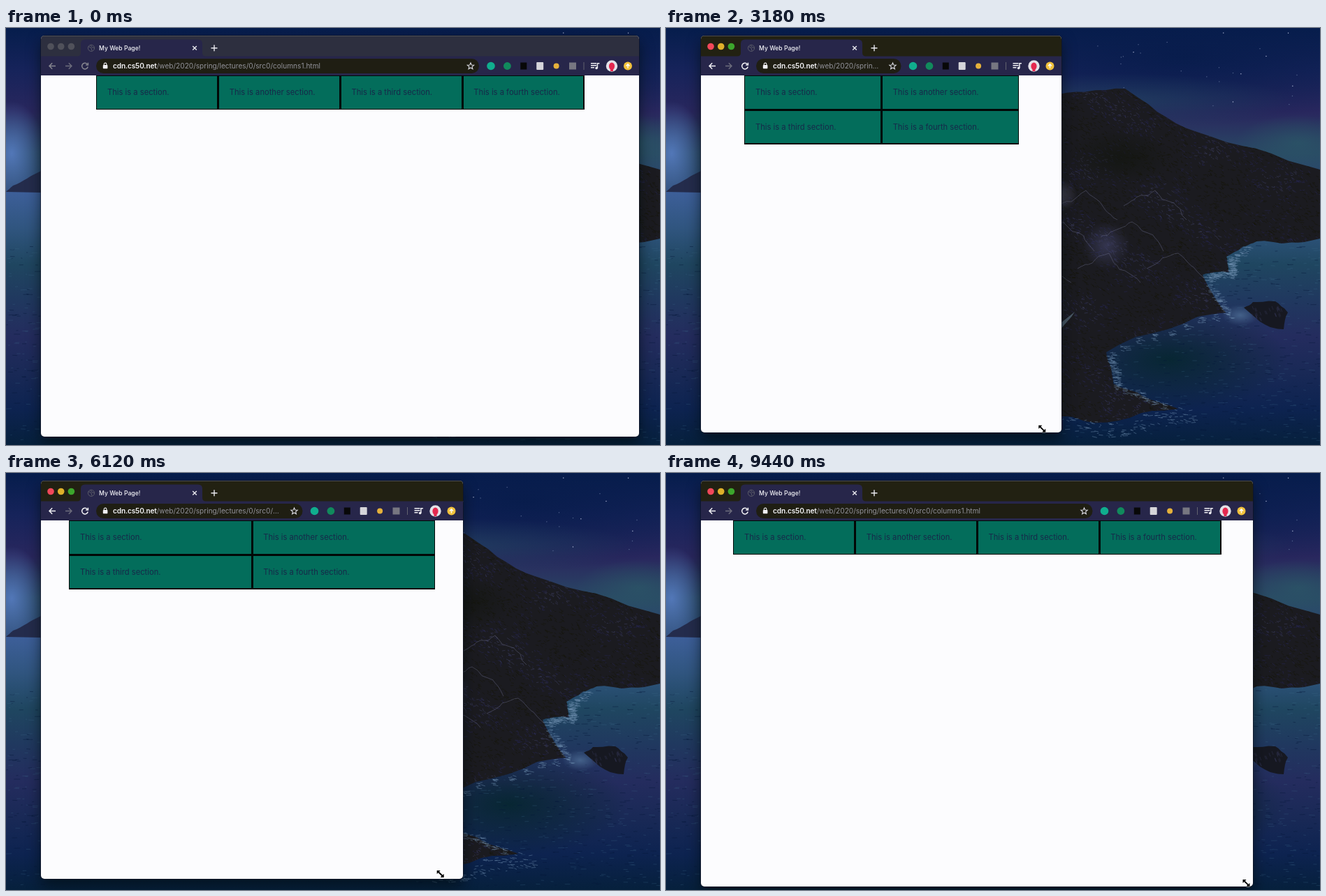
Animation, 936 px wide and 598 px high, one loop 9.46 s. Source, as an HTML page with a canvas:

```html
<!DOCTYPE html>
<html lang="en">
<head>
<meta charset="utf-8">
<title>Resizing columns</title>
<style>
html, body { margin: 0; width: 100%; height: 100%; overflow: hidden; background: #0b1c47; }
body { font-family: Inter, "Open Sans", sans-serif; }
#stage { position: relative; width: 936px; height: 598px; overflow: hidden; }
#wall, #cursor { position: absolute; left: 0; top: 0; }
#win {
  position: absolute; left: 50px; top: 10.5px; overflow: hidden;
  border-radius: 5px; background: #fcfcfe;
  box-shadow: 0 0 0 .6px #111322, 0 10px 20px rgba(0, 12, 14, .65);
}
#bar { position: absolute; left: 0; top: 0; }
#url {
  position: absolute; left: 103px; top: 35.5px; height: 16px; line-height: 16px;
  font-size: 10.1px; color: #92929a; white-space: nowrap;
  overflow: hidden; text-overflow: ellipsis;
}
#url b { font-weight: 600; color: #f6f6fa; letter-spacing: -.15px; }
#grid {
  position: absolute; top: 57.5px; display: grid; box-sizing: border-box;
  gap: 3px; padding: 1.4px; grid-auto-rows: 46.5px; background: #020706;
}
#grid div {
  padding-left: 14.6px; line-height: 46.5px; overflow: hidden; white-space: nowrap;
  font-size: 11.2px; background: #036d5b; color: #17294a;
}
</style>
</head>
<body>
<div id="stage">
  <canvas id="wall" width="936" height="598"></canvas>
  <div id="win">
    <svg id="bar" width="886" height="57.5" viewBox="50 10.5 886 57.5" fill="none">
      <rect id="strip" x="50" y="10" width="886" height="31"/>
      <path d="M50 11H936" stroke="#55565a" stroke-width=".8"/>
      <path d="M50 40H102Q107 40 107 35V22Q107 16 113 16H275Q281 16 281 22V35Q281 40 286 40H936V68H50Z" fill="#27264a"/>
      <g id="lights">
        <circle cx="64" cy="26" r="4.8"/>
        <circle cx="78.7" cy="26" r="4.8"/>
        <circle cx="93.4" cy="26" r="4.8"/>
      </g>
      <g stroke="#5a5b68">
        <circle cx="122" cy="28.3" r="4.6"/>
        <path d="M118 26l4 2 1 4M121 24l2 3 3 1"/>
      </g>
      <text x="133" y="31.4" font-size="8.6" font-weight="500" fill="#f4f4f8">My Web Page!</text>
      <g stroke="#e8e8ee" stroke-width="1.4">
        <path d="M267.2 25.5l5.6 5.6m0-5.6l-5.6 5.6"/>
        <path d="M293.5 28.3h9m-4.5-4.5v9"/>
      </g>
      <g id="nav" stroke-width="1.5">
        <path d="M71 54H62m4.2-4.2L62 54l4.2 4.2"/>
        <path d="M116.2 51.2A4.3 4.3 0 1 0 117.2 55M117.4 49.2v3.2h-3.2"/>
      </g>
      <path d="M85 54h9m-4.2-4.2L94 54l-4.2 4.2" stroke="#6d6d7c" stroke-width="1.4"/>
      <rect id="pill" x="129" y="43.5" height="21" rx="10.5" fill="#1f1e13"/>
      <rect x="138.8" y="52.6" width="6.6" height="5.2" rx=".8" fill="#f0f0f4"/>
      <path d="M140.3 53v-1.6a1.8 1.8 0 0 1 3.6 0V53" stroke="#f0f0f4" stroke-width="1.1"/>
      <path id="star" d="M0-4.6L1.3-1.5 4.7-1.2 2.1 1 2.9 4.3 0 2.5-2.9 4.3-2.1 1-4.7-1.2-1.3-1.5Z" stroke="#d6d6de" stroke-width="1.1"/>
      <g id="exts">
        <circle r="5.8" fill="#10ad8e"/>
        <circle r="5.4" fill="#118a5c"/>
        <rect x="-4.5" y="-5" width="9" height="10" fill="#080808"/>
        <rect x="-5" y="-5.5" width="10" height="11" rx="1" fill="#d5d5da"/>
        <circle r="4" fill="#e5b13b"/>
        <rect x="-5" y="-5" width="10" height="10" fill="#777781"/>
      </g>
      <g id="tail">
        <path d="M-79 48.5v11" stroke="#62626f"/>
        <path d="M-69 50.3h8M-69 53.3h8M-69 56.3h5M-59.6 57V50.3h3" stroke="#f0f0f4" stroke-width="1.5"/>
        <circle cx="-60.9" cy="57" r="1.8" fill="#f0f0f4"/>
        <circle cx="-39" cy="54" r="8.2" fill="#e3e2e8"/>
        <ellipse cx="-39" cy="54.3" rx="4.1" ry="5.3" fill="#e4284f"/>
        <path d="M-41 58h4v3.6h-4z" fill="#e4284f"/>
        <circle cx="-16" cy="54" r="6" fill="#f1c13c"/>
        <path d="M-16 57v-5.5m-2.5 2.5l2.5-2.7 2.5 2.7" stroke="#fff" stroke-width="1.4"/>
      </g>
    </svg>
    <div id="url"><b>cdn.cs50.net</b>/web/2020/spring/lectures/0/src0/columns1.html</div>
    <div id="grid">
      <div>This is a section.</div>
      <div>This is another section.</div>
      <div>This is a third section.</div>
      <div>This is a fourth section.</div>
    </div>
  </div>
  <svg id="cursor" width="14" height="14" viewBox="-7 -7 14 14">
    <path d="M-5-5H0L-1.7-3.1 3.1 1.7 5 0V5H0L1.7 3.1-3.1-1.7-5 0Z" fill="#000" stroke="#fff" paint-order="stroke"/>
  </svg>
</div>
<script>
const $ = id => document.getElementById(id);
const LOOP = 9460, LEFT = 50, TOP = 10.5, SCALE = .728, SLOT = 23.4, LAG = 38;

// Turning points of the drag: time, right edge, bottom edge
const TURNS = [[2346, 906, 586], [3600, 445, 578], [5600, 862, 601], [6640, 445, 563], [8040, 839.5, 593]];

function corner(t) {
  const i = TURNS.findIndex(turn => t < turn[0]);
  if (i <= 0) return TURNS.at(i).slice(1);
  const [t0, ...from] = TURNS[i - 1], [t1, ...to] = TURNS[i];
  const u = (t - t0) / (t1 - t0), ease = u * u * (3 - 2 * u);
  return from.map((v, k) => v + (to[k] - v) * ease);
}

function layout(right) {
  const width = right - LEFT, css = width / SCALE;
  const cols = css >= 992 ? 4 : css >= 576 ? 2 : 1;
  const limit = [960, 720, 540].find(w => css >= w + (w > 900 ? 32 : w > 700 ? 48 : 36));
  const box = limit ? limit * SCALE : width;
  const grid = $('grid').style;
  grid.gridTemplateColumns = `repeat(${cols}, 1fr)`;
  grid.width = box + 'px';
  grid.left = Math.ceil((width - box) / 2) + 'px';

  const hidden = Math.min(6, Math.max(0, Math.ceil((300 - (right - 229)) / SLOT)));
  const shift = right + hidden * SLOT, star = shift - 241;
  $('pill').setAttribute('width', star + 12 - 129);
  $('star').setAttribute('transform', `translate(${star} 54)`);
  $('url').style.width = star - 16 - 153 + 'px';
  [...$('exts').children].forEach((icon, i) => {
    icon.setAttribute('transform', `translate(${shift - 212 + i * SLOT} 54)`);
    icon.style.display = i < 6 - hidden ? '' : 'none';
  });
  $('tail').setAttribute('transform', `translate(${right} 0)`);
}

function setActive(on) {
  const colors = on ? ['#f2485a', '#dfb02a', '#3ca62c'] : Array(3).fill('#50515a');
  [...$('lights').children].forEach((c, i) => c.setAttribute('fill', colors[i]));
  $('strip').setAttribute('fill', on ? '#222112' : '#2d2f3f');
  $('nav').setAttribute('stroke', on ? '#f0f0f4' : '#85858f');
}

function paintWall() {
  const c = $('wall').getContext('2d');
  let seed = 7;
  const rnd = () => (seed = seed * 16807 % 2147483647) / 2147483647;
  const band = (y0, y1, ...colors) => {
    const g = c.createLinearGradient(0, y0, 0, y1);
    colors.forEach((color, i) => g.addColorStop(i / (colors.length - 1), color));
    c.fillStyle = g;
    c.fillRect(0, y0, 936, y1 - y0);
  };
  const glow = (x, y, rx, ry, color) => {
    c.save();
    c.translate(x, y);
    c.scale(rx, ry);
    const g = c.createRadialGradient(0, 0, 0, 0, 0, 1);
    g.addColorStop(0, color);
    g.addColorStop(1, color.slice(0, 7) + '00');
    c.fillStyle = g;
    c.fillRect(-1, -1, 2, 2);
    c.restore();
  };
  const dash = (x, y, dx, dy, color) => {
    c.strokeStyle = color;
    c.beginPath();
    c.moveTo(x, y);
    c.lineTo(x + dx, y + dy);
    c.stroke();
  };
  // Turns a few key points into a rugged outline
  const rugged = (text, rough, depth = 3) => {
    let points = text.split(' ').map(p => p.split(',').map(Number));
    while (depth--) points = points.flatMap((p, i) => {
      const q = points[i + 1];
      if (!q) return [p];
      const size = Math.hypot(q[0] - p[0], q[1] - p[1]) * rough;
      return [p, p.map((v, k) => (v + q[k]) / 2 + (rnd() - .5) * size)];
    });
    return points;
  };
  const shape = (points, fill) => {
    c.beginPath();
    points.forEach(p => c.lineTo(...p));
    c.closePath();
    c.fillStyle = fill;
    c.fill();
  };

  // sky
  band(0, 240, '#061d4c', '#16235a', '#29275e', '#294864', '#2c4a74');
  glow(740, 40, 330, 100, '#071c4bdd');
  glow(640, 105, 260, 40, '#25506588');
  glow(905, 165, 90, 40, '#2b5767bb');
  glow(8, 180, 48, 75, '#5277b8');
  for (let i = 0; i < 30; i++) {
    c.fillStyle = i % 4 ? '#55658f' : '#b8c0dc';
    c.fillRect(490 + rnd() * 440, rnd() * 120, 1.2, 1.2);
  }

  // sea
  band(235, 598, '#3d5f99', '#30557f', '#1f4660', '#20385f', '#242c5e', '#192956', '#0d2350', '#06203c');
  glow(720, 475, 170, 75, '#062630ee');
  for (let i = 0; i < 900; i++) {
    const x = rnd() < .12 ? rnd() * 50 : 560 + rnd() * 376;
    dash(x, 308 + rnd() * 285, 2 + rnd() * 7, rnd() - .5, i % 2 ? '#40708e40' : '#05173a70');
  }

  // land
  shape(rugged('0,235 10,226 50,205 50,236', .06), '#242c4c');
  const ridge = rugged('440,125 545,96 657,87 757,148 936,203', .09);
  const shore = rugged('936,302 845,306 802,328 806,350 768,354 801,408 630,465 640,510 733,546 600,564 440,545', .14);
  c.save();
  shape([...ridge, ...shore], '#1b1b20');
  c.clip();
  for (let i = 0; i < 9000; i++) {
    const x = 440 + rnd() * 496, y = 80 + rnd() * 490;
    const relief = Math.sin(x / 23 + 2 * Math.sin(y / 31)) + Math.sin(y / 17 - x / 37) + (rnd() - .5) * 2;
    const color = relief > 1.5 ? '#3b3d5e90' : relief > .2 ? '#26265099' : '#17170cb0';
    dash(x, y, 1 + rnd() * 4, rnd() * 5 - 1, color);
  }
  glow(650, 185, 75, 40, '#11140caa');
  glow(562, 240, 26, 24, '#5c5a72aa');
  glow(630, 312, 34, 34, '#44466e99');
  for (let i = 0; i < 7; i++) {
    const x = 490 + i * 33, y = 345 - i % 3 * 45;
    c.strokeStyle = '#686a8877';
    c.beginPath();
    rugged(`${x},${y} ${x + 45},${y - 22} ${x + 90},${y + 20}`, .25).forEach(p => c.lineTo(...p));
    c.stroke();
  }
  shape(rugged('585,407 545,459 482,509 525,455', .08), '#4a5a68');
  c.restore();

  // surf and rock
  for (let i = 12; i < shore.length; i++) {
    const [x, y] = shore[i], wide = x < 740 && y > 540 ? 22 : 9;
    for (let k = 0; k < 9; k++)
      dash(x + rnd() * wide, y + rnd() * wide, 2 + rnd() * 6, rnd() * 3 - 1, '#6f91b077');
  }
  glow(822, 412, 26, 15, '#5a7fa599');
  shape(rugged('827,401 840,393 872,392 890,408 884,432 850,421', .15, 2), '#161821');
  for (let i = 0; i < 30; i++) dash(838 + rnd() * 42, 398 + rnd() * 18, 2, 5, '#34365677');
}

function frame() {
  const t = Math.floor(performance.now() % LOOP / 20) * 20;
  const [right, bottom] = corner(t), [x, y] = corner(t + LAG);
  $('win').style.width = right - LEFT + 'px';
  $('win').style.height = bottom - TOP + 'px';
  layout(right);
  setActive(t >= 1700);
  $('cursor').style.transform = `translate(${x - 16}px, ${y - 12}px)`;
  $('cursor').style.visibility = t >= 1400 ? 'visible' : 'hidden';
  requestAnimationFrame(frame);
}

paintWall();
frame();
</script>
</body>
</html>
```
